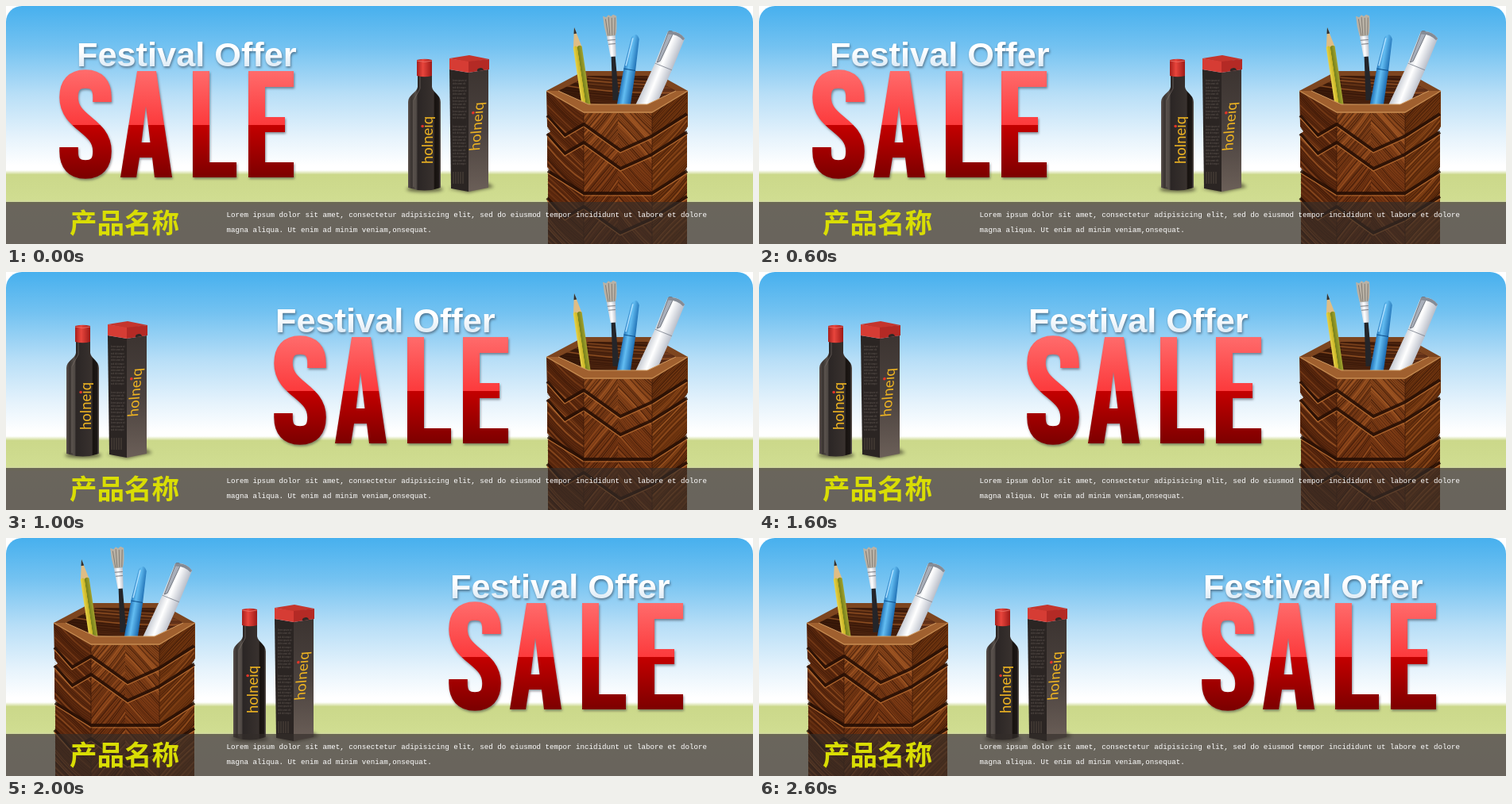
Write an HTML page that moves like this. It is 940 by 300 pixels and loops after 3000 ms.

```html
<!DOCTYPE html>
<html lang="en">
<head>
<meta charset="utf-8">
<title>Festival Offer</title>
<style>
  html, body { margin: 0; width: 100%; height: 100%; overflow: hidden; background: #fff; }
  svg { display: block; width: 940px; height: 300px; }
  .head { font: bold 43.3px "Liberation Sans", Arial, sans-serif; }
  .title { font: bold 34.5px "Noto Sans CJK SC", "Noto Sans CJK", sans-serif; fill: #d9dd04; }
  .copy { font: 9.17px "Liberation Mono", "Courier New", monospace; fill: #fff; white-space: pre; }
  .brand { font: 18.5px Lato, sans-serif; fill: #edb322; }
  .tiny { font: 2.6px "Liberation Sans", sans-serif; fill: #8c8078; }
  .shade { filter: drop-shadow(1px 2px 1.5px rgba(40, 40, 50, .5)); }
  .soft { filter: blur(2px); }
</style>
</head>
<body>
<svg viewBox="0 0 940 300">
  <defs>
    <clipPath id="card"><rect width="940" height="340" rx="20"/></clipPath>
    <linearGradient id="sky" x2="0" y2="1">
      <stop stop-color="#47b0ee"/><stop offset=".24" stop-color="#73c2f1"/>
      <stop offset=".53" stop-color="#b9dff7"/><stop offset=".78" stop-color="#e6f3fc"/>
      <stop offset=".95" stop-color="#fff"/>
    </linearGradient>
    <linearGradient id="ground" x2="0" y2="1">
      <stop stop-color="#fff"/><stop offset=".06" stop-color="#cbd88a"/>
      <stop offset=".4" stop-color="#d0dd91"/><stop offset=".48" stop-color="#d0ceba"/>
      <stop offset="1" stop-color="#cdcbb9"/>
    </linearGradient>
    <linearGradient id="red" gradientUnits="userSpaceOnUse" x1="0" x2="0" y1="82" y2="216">
      <stop stop-color="#ff6b6b"/><stop offset=".507" stop-color="#fc3a3c"/>
      <stop offset=".507" stop-color="#c40000"/><stop offset="1" stop-color="#7c0000"/>
    </linearGradient>
    <linearGradient id="white" gradientUnits="userSpaceOnUse" x1="0" x2="0" y1="46" y2="78">
      <stop offset=".3" stop-color="#fff"/><stop offset="1" stop-color="#dceaf5"/>
    </linearGradient>
    <linearGradient id="glass">
      <stop stop-color="#5b514d"/><stop offset=".1" stop-color="#3a3431"/>
      <stop offset=".24" stop-color="#57504b"/><stop offset=".3" stop-color="#2b2625"/>
      <stop offset=".78" stop-color="#38312e"/><stop offset=".82" stop-color="#17120f"/>
      <stop offset=".94" stop-color="#1d1816"/><stop offset="1" stop-color="#635a55"/>
    </linearGradient>
    <linearGradient id="cap">
      <stop stop-color="#a81f1c"/><stop offset=".4" stop-color="#e8453c"/><stop offset="1" stop-color="#9e1a18"/>
    </linearGradient>
    <linearGradient id="side" x2="0" y2="1">
      <stop stop-color="#3c3431"/><stop offset=".5" stop-color="#4b423e"/><stop offset="1" stop-color="#6b5f58"/>
    </linearGradient>
    <linearGradient id="wood" x2="0" y2="1">
      <stop stop-color="#87451a"/><stop offset=".5" stop-color="#793813"/><stop offset="1" stop-color="#642b0e"/>
    </linearGradient>
    <linearGradient id="yellow"><stop stop-color="#e9d348"/><stop offset=".45" stop-color="#c7b425"/><stop offset=".5" stop-color="#76801c"/><stop offset="1" stop-color="#a3a32d"/></linearGradient>
    <linearGradient id="blue"><stop stop-color="#1d6fb5"/><stop offset=".4" stop-color="#63bdf2"/><stop offset="1" stop-color="#1766ac"/></linearGradient>
    <linearGradient id="pearl"><stop stop-color="#c3c8d1"/><stop offset=".45" stop-color="#fff"/><stop offset="1" stop-color="#b9bec9"/></linearGradient>
  </defs>

  <g clip-path="url(#card)">
    <rect width="940" height="212" fill="url(#sky)"/>
    <rect y="207" width="940" height="93" fill="url(#ground)"/>

    <g id="head" class="shade">
      <text class="head" x="89" y="76" fill="url(#white)">Festival Offer</text>
    </g>

    <g id="sale" class="shade" fill="url(#red)">
      <path d="M121 121V115Q121 92 100 92T79 115C79 148 121 150 121 183Q121 206 100 206T79 183V178" fill="none" stroke="url(#red)" stroke-width="23.5"/>
      <path fill-rule="evenodd" d="M165 82H189L209 216H187L184 191H168L164 216H144ZM170.500 172H181.500L176 126Z"/>
      <path d="M235 82H256V197H290V216H235Z"/>
      <path d="M305 82H362V102H326V140H351V159H326V197H362V216H305Z"/>
    </g>

    <g id="goods">
      <ellipse class="soft" cx="527" cy="231" rx="23" ry="3.500" fill="#302c20" opacity=".7"/>
      <path class="soft" d="M557 230L582 235L614 228L604 222Z" fill="#302c20" opacity=".7"/>
      <path d="M518 86H536V102C537 109 547 112 547 121V229Q527 236 506 229V121C506 112 517 109 518 102Z" fill="url(#glass)"/>
      <path d="M521 89V104L513 119V228" fill="none" stroke="#81766f" opacity=".6"/>
      <path d="M517 68Q527 65.500 536 68V88Q527 90.500 517 88Z" fill="url(#cap)"/>
      <path d="M517 69Q527 72 536 69" fill="none" stroke="#f0756b" stroke-width=".8"/>
      <path d="M558 80L582 84V234L560 230Z" fill="#2b2523"/>
      <path d="M582 84L607 80V229L582 234Z" fill="url(#side)"/>
      <path d="M558 66L583 62L608 67L582 71Z" fill="#c4352d"/>
      <path d="M558 66L582 70V84L558 80Z" fill="#d63c34"/>
      <path d="M582 70L608 67V80L582 84Z" fill="#b42a25"/>
      <path d="M593 82.300A4 3.500 0 0 1 601 81Z" fill="#302825"/>
      <g id="print"></g>
      <g class="label" transform="translate(536.500 199) rotate(-90)"><text class="brand">holneiq</text></g>
      <g class="label" transform="matrix(.09 -1.020 1 -.08 596 182)"><text class="brand">holneiq</text></g>
    </g>

    <g id="pot">
      <path d="M680 107L727 82H813L858 107L813 134H727Z" fill="#7d451f"/>
      <path d="M695 107L733 88H807L843 107L807 125H733Z" fill="#3c1b0a"/>
      <path d="M733 88H807V125H733Z" fill="#4b230e"/>
      <path d="M807 88L843 107L807 125Z" fill="#65331a"/>
      <g id="inside"></g>

      <g transform="translate(715 27) rotate(-8.500)">
        <path d="M0 0L6 26H-5Z" fill="#dfbd85"/>
        <path d="M0 0L2 8H-1.700Z" fill="#303030"/>
        <path d="M-5 25Q-2 22 0 25Q3 22 6 25V100H-5Z" fill="url(#yellow)"/>
      </g>
      <g transform="translate(760 11) rotate(-4)">
        <path d="M4 51L9 51L10 108H2Z" fill="#242529" transform="translate(-6)"/>
        <path d="M-9 1L-5 3L-2 0L1 2L4 0L8 2Q8 20 5 27H-6Q-9 14 -9 1Z" fill="#b9b2a6"/>
        <path d="M-6 5L-4 26M-2 3V26M2 4L1 26M6 4L4 26" stroke="#77716a" stroke-width=".8"/>
        <path d="M-6 27H5L4 53H-3Z" fill="url(#pearl)"/>
        <path d="M-5.500 32H4.500M-4.500 37H4.300" stroke="#777b82"/>
      </g>
      <g transform="translate(793 34) rotate(9.500)">
        <path d="M-5 7Q0 -3 5 7L7 48L8 94H-9L-8 45Z" fill="url(#blue)"/>
        <path d="M-8 47H7" stroke="#0e4f8a"/>
        <path d="M-3 7L-6 43" stroke="#aee0ff" stroke-width="1.500"/>
      </g>
      <g transform="translate(845 34) rotate(22)">
        <path d="M-12 3Q0 -4 11 3V46L9 103H-15L-12 46Z" fill="url(#pearl)"/>
        <path d="M-12 46H11" stroke="#8c929c"/>
        <path d="M-11 2Q-5 -2 -5 5L-7 41L-10 44Z" fill="#a9afba" stroke="#686d77" stroke-width=".8"/>
        <path d="M-12 3Q0 -4 11 3L10 6Q0 1 -11 6Z" fill="#858b95"/>
      </g>

      <path d="M680 107L695 107L733 124H807L843 107H858L813 134H727Z" fill="#a0602f"/>
      <path d="M695 107L733 124H807L843 107" fill="none" stroke="#d19a60"/>
      <path d="M680 107L727 134V300H682V212L685 208L681 203V162L685 158L681 152Z" fill="#5d290e"/>
      <path d="M727 134H813V300H727Z" fill="url(#wood)"/>
      <path d="M813 134L858 107V152L854 158L857 162V203L854 208L857 212V300H813Z" fill="#70350f"/>
      <g id="grain"></g>
      <g id="grooves" fill="none" stroke-linejoin="round"></g>
      <path d="M680 107L727 134H813L858 107" fill="none" stroke="#c68b50" stroke-width="1.300"/>
      <path d="M727 135V300M813 135V300" stroke="#2f1206" opacity=".6"/>
    </g>

    <rect y="247" width="940" height="53" fill="#342d2a" opacity=".65"/>
    <text class="title" x="80" y="286">产品名称</text>
    <text class="copy" x="277.500" y="266">Lorem ipsum dolor sit amet, consectetur adipisicing elit, sed do eiusmod tempor incididunt ut labore et dolore</text>
    <text class="copy" x="277.500" y="285">magna aliqua. Ut enim ad minim veniam,onsequat.</text>
  </g>
</svg>
<script>
  const NS = 'http://www.w3.org/2000/svg';
  const $ = id => document.getElementById(id);

  function add(parent, tag, attrs, text) {
    const el = document.createElementNS(NS, tag);
    for (const k in attrs) el.setAttribute(k, attrs[k]);
    if (text) el.textContent = text;
    return parent.appendChild(el);
  }

  let seed = 7;
  const rnd = () => (seed = seed * 16807 % 2147483647) / 2147483647;

  // Wavy grain across one face; slope is the rise over its width.
  function grain(parent, name, shape, x0, x1, y0, y1, slope, gap) {
    const clip = add(parent, 'clipPath', { id: name });
    add(clip, 'path', { d: shape });
    const g = add(parent, 'g', { 'clip-path': `url(#${name})`, fill: 'none' });
    const w = x1 - x0;
    for (let y = y0 - Math.abs(slope); y < y1 + Math.abs(slope); y += gap) {
      const bend = Math.sin(y / 13) * 5 + rnd() * 3;
      add(g, 'path', {
        d: `M${x0} ${y}q${w / 2} ${slope / 2 + bend} ${w} ${slope}`,
        stroke: rnd() < .7 ? '#2c1005' : '#b2652c',
        'stroke-width': .6 + rnd() * .9,
        opacity: .3 + rnd() * .35
      });
    }
  }

  const wood = $('grain');
  grain(wood, 'left', 'M681 108L727 135V300H682Z', 681, 727, 105, 300, 44, 3.2);
  grain(wood, 'midA', 'M727 135H770V300H727Z', 727, 770, 130, 300, -52, 3.4);
  grain(wood, 'midB', 'M770 135H813V300H770Z', 770, 813, 130, 300, 48, 3.4);
  grain(wood, 'right', 'M813 135L857 108V300H813Z', 813, 857, 105, 300, -46, 3.2);
  grain($('inside'), 'well', 'M695 107L733 88H807L843 107L807 125H733Z', 695, 843, 88, 125, 10, 3);

  const zigzag = 'M681 138L703 163L727 149L773 182L813 164L857 136';
  const seam = 'M682 208L727 236H813L857 208';
  function groove(d, dy) {
    const at = n => `translate(0 ${dy + n})`;
    add($('grooves'), 'path', { d, stroke: '#240d04', 'stroke-width': 4, opacity: .85, transform: at(0) });
    add($('grooves'), 'path', { d, stroke: '#b1682f', 'stroke-width': 1.2, transform: at(3) });
  }
  groove(zigzag, 0);
  groove(zigzag, 23);
  groove(seam, 0);
  groove(zigzag, 104);

  for (let i = 0; i < 24; i++) {
    add($('print'), 'text', { class: 'tiny', x: 562, y: 95 + i * 4.3 + (i > 11 ? 6 : 0), opacity: .55 },
      ['lorem ipsum sit', 'dolor amet elit', 'sed do tempor'][i % 3]);
  }
  for (let x = 563; x < 578; x += 3) {
    add($('print'), 'path', { d: `M${x} 209v15`, stroke: '#51463f', 'stroke-width': 1 });
  }

  // Red dot over the letter i.
  for (const label of document.querySelectorAll('.label')) {
    const text = label.firstChild;
    const cx = (text.getStartPositionOfChar(5).x + text.getEndPositionOfChar(5).x) / 2;
    add(label, 'circle', { cx, cy: -12.4, r: 1.8, fill: '#e03428' });
  }

  const moves = {
    head: [[0, 0], [250, 0], [470, 0]],
    sale: [[0, 0], [270, 0], [490, 0]],
    goods: [[0, 0], [-430, 0], [-220, 22]],
    pot: [[0, 0], [0, 0], [-620, 0]]
  };
  for (const id in moves) {
    const steps = [...moves[id], moves[id][2]];
    $(id).animate(steps.map(([x, y], i) => ({
      transform: `translate(${x}px, ${y}px)`, offset: i / 3, easing: 'step-end'
    })), { duration: 3000, iterations: Infinity });
  }
</script>
</body>
</html>
```
